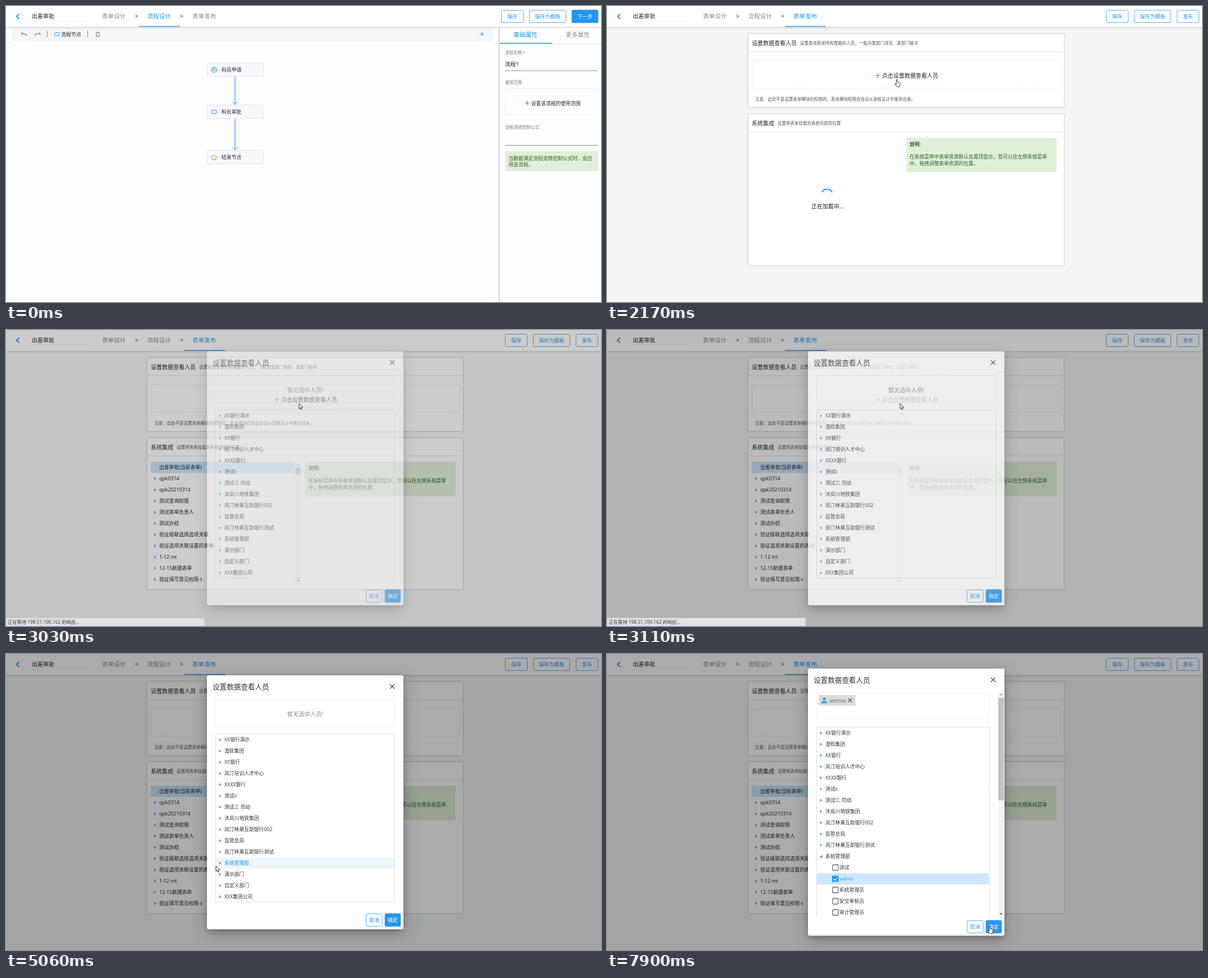
An HTML page for the animation above (7.99 s loop, 1060 px wide and 528 px high).

```html
<!DOCTYPE html>
<html lang="zh-CN">
<head>
<meta charset="utf-8">
<style>
html, body { margin: 0; width: 100%; height: 100%; overflow: hidden; background: #fff; }
svg { display: block; width: 1060px; height: 528px; }
text { font-family: 'Open Sans', 'Noto Sans CJK SC', 'Noto Sans CJK', sans-serif; white-space: pre; }
.card { filter: drop-shadow(0 .7px .8px rgba(0,0,0,.38)); }
.bar { filter: drop-shadow(0 1px 1.5px rgba(0,0,0,.22)); }
.modal { filter: drop-shadow(0 4px 4px rgba(0,0,0,.18)) drop-shadow(0 7px 13px rgba(0,0,0,.25)); }
</style>
</head>
<body>
<svg viewBox="0 0 1060 528">
  <clipPath id="modalBody"><rect x="359" y="66" width="348" height="404"/></clipPath>
  <g id="page"></g>
  <g id="header"></g>
  <rect id="shade" width="1060" height="528"/>
  <g id="dialog"></g>
  <g id="status"></g>
  <g id="cursor"></g>
</svg>
<script>
const LOOP = 7990, BLUE = '#2196f3', INK = '#222', GREY = '#8a8a8a', GREEN = '#2c5e2a';
const T = { tab: 850, page: 1000, loaded: 2330, open: 2790, waitEnd: 3410, expand: 5480, check: 7000 };

const el = id => document.getElementById(id);
const ramp = (t, a, b) => Math.min(1, Math.max(0, (t - a) / (b - a)));
const smooth = k => k * k * (3 - 2 * k);

// Drawing helpers; text is placed by its vertical centre
const txt = (x, cy, size, s, fill = INK, extra = '') =>
  `<text x="${x}" y="${cy + size * .37}" font-size="${size}" fill="${fill}" ${extra}>${s}</text>`;
const box = (x0, y0, x1, y1, fill, extra = '') =>
  `<rect x="${x0}" y="${y0}" width="${x1 - x0}" height="${y1 - y0}" fill="${fill}" ${extra}/>`;
const frame = (x0, y0, x1, y1, stroke, extra = '') =>
  box(x0 + .5, y0 + .5, x1 - .5, y1 - .5, 'none', `stroke="${stroke}" ${extra}`);
const dashed = (...r) => frame(...r, '#e2e2e2', 'stroke-dasharray="2 1.5"');
const line = (d, stroke, w = 1, extra = '') =>
  `<path d="${d}" fill="none" stroke="${stroke}" stroke-width="${w}" ${extra}/>`;
const fill = (d, color) => `<path d="${d}" fill="${color}"/>`;
const plus = (x, y, r = 4) => line(`M${x - r} ${y}h${2 * r}M${x} ${y - r}v${2 * r}`, BLUE, 1.2);
const cross = (x, y, r, color) =>
  line(`M${x - r} ${y - r}l${2 * r} ${2 * r}M${x + r} ${y - r}l${-2 * r} ${2 * r}`, color, 1.2);
const caret = (x, cy) => fill(`M${x} ${cy - 2.7}l3 2.7l-3 2.7z`, BLUE);
const button = (x0, y0, x1, s, solid) =>
  (solid ? box(x0, y0, x1, y0 + 23, BLUE, 'rx="2.5" class="card"')
    : frame(x0, y0, x1, y0 + 23, BLUE, 'rx="2" stroke-opacity=".75"')) +
  txt((x0 + x1) / 2, y0 + 11.3, 9.1, s, solid ? '#fff' : BLUE, 'text-anchor="middle"');

function header(t) {
  const last = t >= T.tab, done = t >= T.page;
  const x = 236.5 + 80.5 * smooth(ramp(t, T.tab, T.page));
  return box(0, 0, 1060, 37.5, '#fff', 'class="bar"') +
    line('M23.5 14L18.7 18.5L23.5 23', BLUE, 1.8) +
    txt(46, 18, 10, '出差审批') + line('M45 26.5H145', '#f0f0f0') +
    ['表单设计', '流程设计', '表单发布'].map((s, i) =>
      txt(171 + 80.5 * i, 18.5, 10.6, s, i == (last ? 2 : 1) ? BLUE : GREY)).join('') +
    txt(230, 18.5, 10, '&gt;') + txt(310, 18.5, 10, '&gt;') +
    box(x, 35.8, x + 73.5, 37.2, BLUE) +
    (done
      ? button(889, 7, 929, '保存') + button(939, 7, 1005, '保存为模板') + button(1015, 7, 1055, '发布')
      : button(882, 7, 922, '保存') + button(932, 7, 998, '保存为模板') + button(1008, 7, 1055, '下一步', true));
}

function node(y, s, icon) {
  return box(358.5, y + .5, 458, y + 24.5, '#f7f8fd', 'stroke="#e0e3ec"') + icon + txt(384, y + 13.2, 8.9, s);
}
const arrow = (y0, y1) =>
  line(`M408 ${y0}V${y1 - 1}`, '#74bcf7', 1.8) + line(`M403.5 ${y1 - 5}l4.5 4.5l4.5 -4.5`, '#74bcf7', 1.5);

function flowPage() {
  return box(0, 38, 1060, 528, '#fefefe') + box(10, 38, 868, 63, '#f4f6fc') +
    line('M30.5 47L27.5 50H33Q36 50 37 53M58 47L61 50H55Q52 50 51 53', GREY, 1.3) +
    line('M73.5 44V56M145.5 44V56', '#888') +
    frame(86, 47, 95.5, 53.5, BLUE, 'rx="1"') + txt(98, 50.5, 9, '流程节点') +
    line('M160 47.5H167M162.5 46.3H164.5M161 48.5V54.5H166V48.5', '#777', 1.1) + plus(848, 50) +
    line('M0 524.5H868', '#ececec') +
    arrow(126, 176) + arrow(201, 257) +
    node(101, '科员申请', `<circle cx="370.5" cy="114" r="4.4" fill="none" stroke="${BLUE}" stroke-width="1.2"/>` +
      fill('M369.2 111.6l3.6 2.4l-3.6 2.4z', BLUE)) +
    node(176, '科长审批', frame(366, 185, 375.5, 192.5, BLUE, 'rx="1"')) +
    node(257, '结束节点', line('M367.7 266.8A4.3 4.3 0 1 0 373.3 266.8M370.5 265V270', '#d89a3c', 1.2)) +
    box(878, 38, 1060, 528, '#fefefe') + box(877.5, 38, 879.5, 528, '#cfcfcf') +
    txt(904, 51.5, 10.7, '基础属性', BLUE) + txt(997, 51.5, 10.7, '更多属性', GREY) +
    line('M880 67.5H1060', '#dedede') + box(880, 65.8, 973, 67.2, BLUE) +
    txt(889, 83.5, 7.5, '流程名称 *', '#777') + txt(889, 103, 9.6, '流程1') + line('M889 115.5H1055', '#999') +
    txt(889, 136, 7.5, '使用范围', '#777') + dashed(889, 147, 1056, 196) +
    plus(928.5, 173) + txt(935.5, 173.5, 8.8, '设置该流程的使用范围') +
    txt(889, 216, 7.6, '流程流转控制公式', '#777') + line('M889 248.5H1055', '#888') +
    box(889, 259, 1055.5, 294.5, '#dff0d8', 'rx="2.5"') +
    txt(895, 271.5, 8.8, '当数据满足流程流转控制公式时，会应', GREEN) + txt(895, 283, 8.8, '用该流程。', GREEN);
}

const FORMS = ['出差审批(当前表单)', 'qpk0314', 'qpk20210314', '测试查询权限', '测试表单负责人', '测试办结',
  '验证级联选择选项关联', '验证选项关联设置的表单', '1-12 mt', '12-15新建表单', '验证填写意见权限-t'];

const formList = () => box(258, 235, 515, 255, '#cbe6fd') +
  FORMS.map((s, i) => (i ? caret(264.3, 245 + 20 * i) : '') + txt(273, 245 + 20 * i, 8.8, s)).join('') +
  box(515.5, 235, 526, 453, '#f3f3f3') + box(516, 246.5, 525.5, 258, '#c1c1c1') +
  fill('M518 242.5h5l-2.5 -2.8z', '#999') + fill('M518 446h5l-2.5 2.8z', '#555');

function spinner(t) {
  const angle = (t - 2170) * .36;
  return line('M382.8 332.3A10.3 10.3 0 0 1 401.2 332.3', BLUE, 2, `transform="rotate(${angle} 392 337)"`) +
    txt(364, 357, 10, '正在加载中...');
}

function publishPage(t) {
  return box(0, 38, 1060, 528, '#f3f5f5') +
    box(251.5, 49.5, 814, 180.5, '#fff', 'class="card"') + box(251.5, 193, 814, 462.5, '#fff', 'class="card"') +
    line('M252 81.5H814M252 224.5H814', '#e6e6e6') +
    txt(258, 66, 10, '设置数据查看人员') +
    txt(344, 66, 7.5, '设置查询表单所有数据的人员，一般为某部门领导、某部门秘书', '#555') +
    dashed(258, 97, 808, 147) + plus(482.5, 124, 4.2) + txt(490, 124, 10, '点击设置数据查看人员') +
    txt(264, 166.3, 7.5, '注意：此处不是设置表单模块的权限的。表单模块权限会自动从流程设计中推导出来。', '#555') +
    txt(258, 209, 10, '系统集成') + txt(304, 209, 7.5, '设置将表单挂载到系统导航的位置', '#555') +
    box(533, 235, 801, 296.5, '#dff0d8', 'rx="2"') + txt(539, 247, 8.8, '说明:', GREEN, 'font-weight="700"') +
    txt(539, 268.5, 8.75, '在系统菜单中表单资源默认会置顶显示，您可以在左侧系统菜单', GREEN) +
    txt(539, 280.5, 8.75, '中，拖拽调整表单资源的位置。', GREEN) +
    (t < T.loaded ? spinner(t) : formList());
}

const UNITS = ['XX银行演示', '澄砾集团', 'XX银行', '岚汀培训人才中心', 'XXXX银行', '测试ii', '测试三 勿动', '沐岚川地铁集团',
  '岚汀林果互助银行002', '监管总局', '岚汀林果互助银行测试', '系统管理部'];
const MORE = ['演示部门', '自定义部门', 'XXX集团公司'];
const PEOPLE = ['测试', 'velmo', '系统管理员', '安全审核员', '审计管理员'];
const PICKED = 13;

function rowAt([x, y], big) {
  const top = big ? 131 : 142.5;
  return x > 373 && x < (big ? 681 : 692) && y > top && y < (big ? 470 : 443) ? Math.floor((y - top) / 20) : -1;
}

function checkbox(cy, on) {
  return on
    ? box(401, cy - 5.5, 412.5, cy + 5.5, BLUE, 'rx="1.5"') + line(`M403.5 ${cy}l2.5 2.6l4.5 -5`, '#fff', 1.4)
    : box(402, cy - 5, 412, cy + 5, '#fff', 'rx="1" stroke="#666" stroke-width="1.3"');
}

function dialog(t) {
  const big = t >= T.expand, checked = t >= T.check;
  const top = big ? 26 : 38, right = big ? 681.5 : 693, first = top + 115;
  const hover = rowAt(pointer(t), big), tinted = rowAt(pointer(t - 100), big);
  const rows = [...UNITS, ...(big ? PEOPLE : MORE)].map((s, i) => {
    const cy = first + 20 * i, person = big && i > 11, on = checked && i == PICKED;
    const back = on ? '#cbe6fd' : i == hover ? '#ecf6fd' : '';
    const mark = person ? checkbox(cy, on)
      : big && i == 11 ? fill(`M383.5 ${cy - 3}v5h-5z`, BLUE) : caret(380, cy);
    return (back && box(374, cy - 10, right - 1, cy + 10, back)) + mark +
      txt(person ? 414 : 389, cy, 8.8, s, on || i == tinted ? BLUE : '#333');
  }).join('');
  const chosen = checked
    ? box(377, 73, 442.5, 92, '#dcdcdc') + `<circle cx="387" cy="80.3" r="2.5" fill="${BLUE}"/>` +
      fill('M382 87.8Q382 83.9 387 83.9T392 87.8z', BLUE) + txt(396, 83, 10.6, PEOPLE[1], '#666') + cross(433, 82.7, 3.2, '#444')
    : txt((373 + right) / 2, top + 69.3, 10.2, '暂无选中人员!', GREY, 'text-anchor="middle"');
  const scroll = box(697, 66, 707.5, 470, '#f3f3f3') + box(697, 78, 707, 261, '#c1c1c1') +
    fill('M699.5 73.5h5l-2.5 -2.8z', '#999') + fill('M699.5 462.5h5l-2.5 2.8z', '#444');
  const y = big ? 475 : 463;
  return box(358, top, 708, big ? 502.5 : 491, '#fff', 'rx="3" class="modal"') +
    txt(368, top + 20.3, 12.6, '设置数据查看人员', '#333') + cross(688, top + 20, 4, '#444') +
    dashed(373, top + 43, right, top + 92) + chosen +
    `<g clip-path="${big ? 'url(#modalBody)' : 'none'}">${rows}` +
    frame(373, top + 104, right, big ? 540 : 443, '#e0e0e0') + (big ? scroll : '') + '</g>' +
    button(641, y, 670.5, '取消') + button(675, y, 703, '确定', true);
}

const statusBar = () => fill('M0 513H351Q354 513 354 516V528H0z', '#dee1e6') + line('M0 513.5H351Q354 513.5 354 516V528', '#bfc2c6') +
  txt(3, 521, 8.3, '正在等待 198.51.100.162 的响应...', '#333');

// Pointer stops: time, x, y, hand shape from then on
const STOPS = [[140, 1057, 530, 0], [450, 1046, 190, 0], [760, 1030, 17, 1], [1050, 1030, 17, 0], [1770, 516.5, 130.5, 1],
  [2640, 522, 131, 0], [3710, 522, 131, 0], [3970, 420, 194, 0], [4050, 420, 194, 0], [4200, 407, 204, 0],
  [4440, 407, 204, 0], [5060, 374, 378, 0], [5210, 374, 378, 0], [5380, 380, 368, 1], [6010, 380, 368, 1],
  [6170, 412, 376, 1], [6320, 412, 376, 1], [6700, 402, 397, 1], [7130, 402, 397, 0], [7800, 682, 485, 1]];

function pointer(t) {
  const i = STOPS.findLastIndex(s => s[0] <= t);
  if (i < 0) return [-50, -50, 0];
  const a = STOPS[i], b = STOPS[i + 1] || a;
  // The short hop when the shape changes is a hard cut
  const k = b[0] == 2640 || a == b ? 0 : smooth(ramp(t, a[0], b[0]));
  return [a[1] + (b[1] - a[1]) * k, a[2] + (b[2] - a[2]) * k, a[3]];
}

const ARROW = 'M0 0V9.5L2.2 7.6L3.7 11L5.2 10.3L3.8 7.1H6.7Z';
const HAND = 'M-1 7V1Q0 -.6 1 1V5L5 5.9Q6.4 6.4 6 8L5 11.5V13.5H.2L-3.6 9Q-4.2 7.4 -2.6 7.6L-1 9Z';

function cursor(t) {
  const [x, y, hand] = pointer(t);
  return `<path d="${hand ? HAND : ARROW}" transform="translate(${x} ${y})" fill="#fff" stroke="#222" stroke-width=".9"/>`;
}

const shown = {};
function put(id, html) {
  if (shown[id] !== html) el(id).innerHTML = shown[id] = html;
}

function draw(now) {
  const t = now % LOOP;
  put('page', t < T.page ? flowPage() : publishPage(t));
  put('header', header(t));
  el('shade').setAttribute('opacity', .33 * ramp(t, T.open, 3190));
  el('dialog').setAttribute('opacity', ramp(t, 2860, 3190));
  put('dialog', t < T.open ? '' : dialog(t));
  put('status', t >= T.open && t < T.waitEnd ? statusBar() : '');
  put('cursor', cursor(t));
  requestAnimationFrame(draw);
}
requestAnimationFrame(draw);
</script>
</body>
</html>
```
